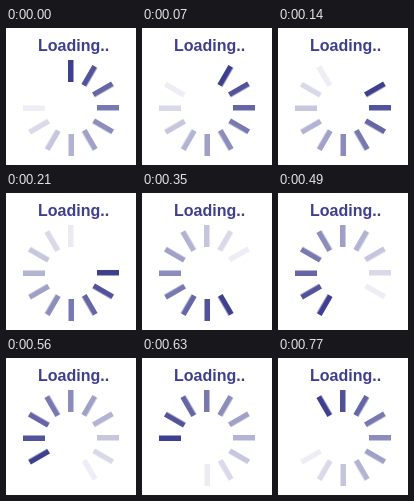
Animation of 130 by 137 pixels, one loop 840 ms. Source, as an HTML page:

```html
<!DOCTYPE html>
<html lang="en">
<head>
<meta charset="utf-8">
<title>Loading</title>
<style>
  html, body { margin: 0; width: 100%; height: 100%; overflow: hidden; background: #fff; }
  svg { display: block; }
  svg { fill: #3f3f90; }
  text { font: bold 16px "Liberation Sans", Arial, sans-serif; }
  .spoke {
    /* the extra millisecond keeps step edges clear of rounding */
    animation: fade 840ms calc(var(--i) * 70ms - 841ms) infinite step-end;
  }
  /* full for one step, gone for two, then back in nine equal steps */
  @keyframes fade {
    0% { opacity: 1; }
    8.3333% { opacity: 0; }
    25% { opacity: .1; animation-timing-function: steps(9, end); }
    100% { opacity: 1; }
  }
</style>
</head>
<body>
<svg width="130" height="137" viewBox="0 0 130 137">
  <text x="32" y="23">Loading..</text>
  <g id="ring" transform="translate(65 80)"></g>
</svg>
<script>
  const ring = document.getElementById('ring');
  for (let i = 0; i < 12; i++) {
    const spoke = document.createElementNS('http://www.w3.org/2000/svg', 'rect');
    const attrs = { class: 'spoke', x: -3, y: -48, width: 5.5, height: 22, transform: `rotate(${i * 30})` };
    for (const key in attrs) spoke.setAttribute(key, attrs[key]);
    spoke.style.setProperty('--i', i);
    ring.append(spoke);
  }
</script>
</body>
</html>
```
